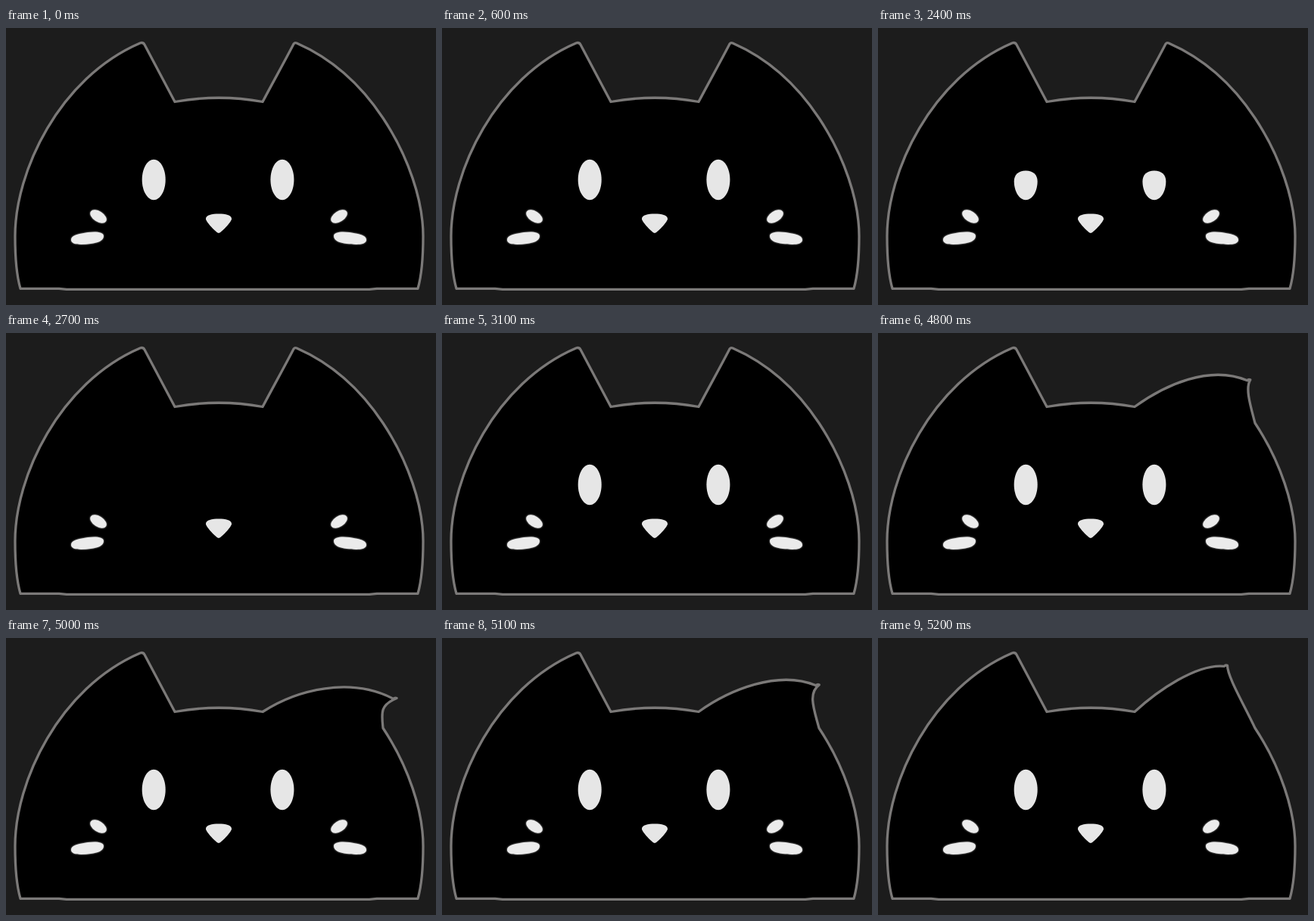
Write an HTML page that moves like this. It is 568 px wide and 366 px high and loops after 5300 ms.

```html
<!DOCTYPE html>
<html lang="en">
<head>
<meta charset="utf-8">
<title>Black cat</title>
<style>
html, body { margin: 0; width: 100%; height: 100%; overflow: hidden; background: #1c1c1c; }
svg { display: block; width: 100vw; height: 100vh; }
#head { stroke: #7b7978; stroke-width: 3.3; stroke-linejoin: round; }
.light { fill: #e6e6e6; }
.whisker { fill: #ebebeb; filter: drop-shadow(0 0 1.2px #aaa); }
</style>
</head>
<body>
<svg viewBox="0 0 568 366" preserveAspectRatio="none">
  <defs>
    <g id="whiskers" class="whisker">
      <ellipse cx="122" cy="249" rx="12" ry="7" transform="rotate(33 122 249)"/>
      <path d="M86 280C86 275 92 273 100 271.5C112 269 129 268 129 275C129 281 121 284 112 285C100 286.5 86 287 86 280Z"/>
    </g>
    <path id="eye" class="light"/>
  </defs>
  <path id="head"/>
  <use href="#eye" x="195.2" y="200.5"/>
  <use href="#eye" x="364.9" y="200.5"/>
  <path class="light" d="M281 271C278 271 263 255 264 252C264 247 272 245.5 281 245.5S298 247 298 252C299 255 284 271 281 271Z"/>
  <use href="#whiskers"/>
  <use href="#whiskers" transform="translate(562) scale(-1 1)"/>
</svg>
<script>
const LOOP = 5300, STEP = 100;
const head = document.getElementById('head');
const eye = document.getElementById('eye');

// Progress 0..1 through an action; 0 outside it. Poses hold for one STEP.
function progress(time, start, end) {
  const held = Math.floor(time / STEP) * STEP;
  return held > start && held < end ? (held - start) / (end - start) : 0;
}

// The ear tip folds outwards and drops, and curls over as the flick goes on.
function earPath(p) {
  const bend = Math.sin(Math.PI * p) ** 0.8;
  const x = 381 + 126 * bend + 15 * p;
  const y = 20 + 62 * bend ** 2;
  const inner = `C${353 + 32 * bend} ${71 - 3 * bend} ${x - 14 - 45 * bend} ${y + 26 - 56 * bend} ${x - 1} ${y + 1}`;
  const tip = `Q${x + 0.5} ${y - 1} ${x + 3} ${y}`;
  const outer = `C${x + 51 - 60 * bend - 20 * p} ${y + 21 - 12 * bend} ${470.5 + 26 * bend} ${77.5 + 22 * bend} 498 119`;
  return inner + tip + outer;
}

function headPath(p) {
  return 'M19 344.3C14 327 12 302 12 275C12 190 70 66 177 20Q181 18.5 183 22L223 97.5Q281 87 339 97.5'
    + earPath(p)
    + 'C531.5 169.7 551 228 551 275C551 302 549 327 544 344.3H490L480 345.4H80L70 344.3Z';
}

// An upright oval around 0,0 whose lid sinks to the lower rim.
function eyePath(p) {
  const shut = Math.sin(Math.PI * p) ** 1.35;
  const rx = 15.5, ry = 26.7, k = 0.55;
  const side = ry * shut ** 2;
  const top = ry * (2 * shut - 1);
  const w = rx * Math.sqrt(1 - shut ** 4);
  const lidK = k + 0.25 * shut;
  const half = (edge, k, dir) => {
    const y = side + (edge - side) * k, a = w * dir;
    return `C${-a} ${y} ${-a * k} ${edge} 0 ${edge}S${a} ${y} ${a} ${side}`;
  };
  return `M${-w} ${side}${half(top, lidK, 1)}${half(ry, k, -1)}Z`;
}

function draw(now) {
  const time = now % LOOP;
  head.setAttribute('d', headPath(progress(time, 4600, 5300)));
  eye.setAttribute('d', eyePath(progress(time, 2300, 3100)));
  requestAnimationFrame(draw);
}
draw(performance.now());
</script>
</body>
</html>
```
